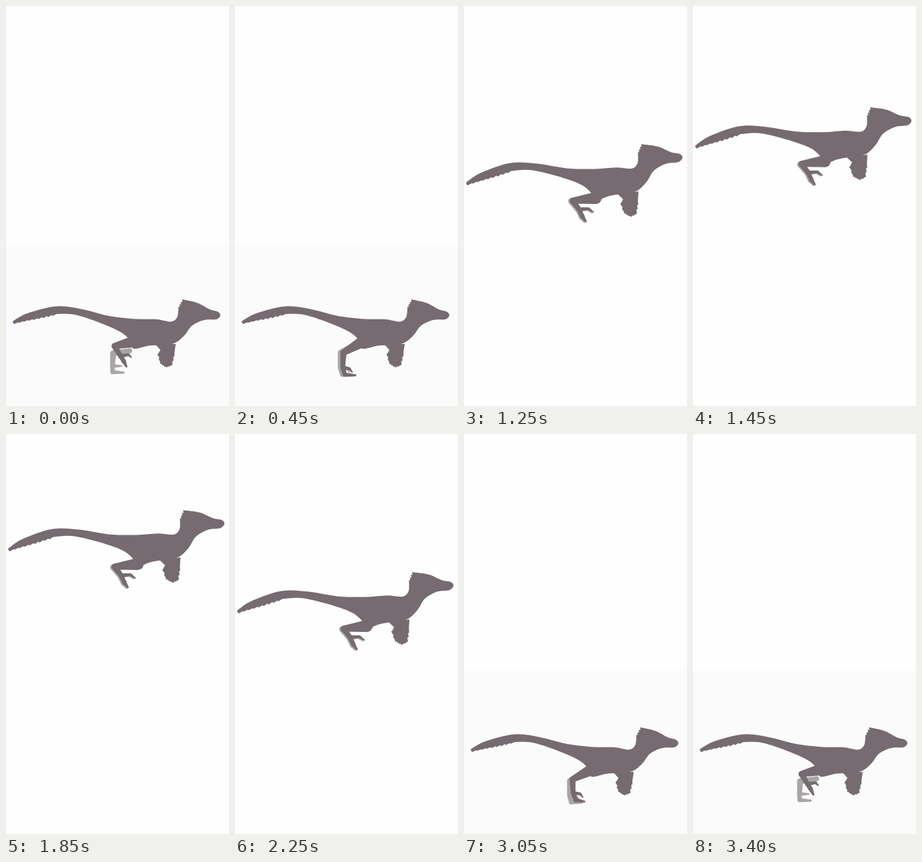
An HTML page that plays this animation: 335x600 px, repeating every 3500 ms.

```html
<!DOCTYPE html>
<html lang="en">
<head>
<meta charset="utf-8">
<title>Leaping raptor</title>
<style>
  html, body { margin: 0; width: 100%; height: 100%; overflow: hidden; background: #fefefe; }
  svg { display: block; width: 100%; height: 100%; }
  .near { fill: #766b70; }
  .far { fill: #a9a5a7; }
  .tint { fill: #fcfbfc; }
</style>
</head>
<body>
<svg viewBox="0 0 335 600">
  <defs><clipPath id="cut"><rect x="17" y="300" width="318" height="300"/></clipPath></defs>
  <g id="stage"></g>
</svg>
<script>
const LOOP = 3500, APEX = 1850;
const GROUND = 440, TOP = 115;

// "x,y x,y" -> [[x, y], ...]
const pts = s => s.split(' ').map(p => p.split(',').map(Number));
const mix = (a, b, k) => a.map((p, i) => p.map((v, c) => v + (b[i][c] - v) * k));
const shift = (a, dx, dy) => a.map(([x, y]) => [x + dx, y + dy]);

// Smooth curve through the points.
function smooth(p) {
  let d = `L${p[0]}`;
  for (let i = 0; i < p.length - 1; i++) {
    const a = p[i], b = p[i + 1], before = p[i - 1] || a, after = p[i + 2] || b;
    const c1 = a.map((v, c) => v + (b[c] - before[c]) / 6);
    const c2 = b.map((v, c) => v - (after[c] - a[c]) / 6);
    d += `C${c1} ${c2} ${b}`;
  }
  return d;
}

// Feathered edge: teeth on the outer side of a clockwise outline.
function fringe([ax, ay], [bx, by], n, depth) {
  const dx = bx - ax, dy = by - ay, len = Math.hypot(dx, dy);
  let d = '';
  for (let i = 0; i < n; i++) {
    const size = depth * (0.75 + 0.25 * Math.sin(i * 7)) / len;
    const tip = (i + 0.85) / n, base = (i + 1) / n;
    d += `L${ax + dx * tip + dy * size},${ay + dy * tip - dx * size}L${ax + dx * base},${ay + dy * base}`;
  }
  return d;
}

// Tapered, rounded chain of bones.
function limb(joints, radii) {
  return joints.map(([x, y], i) => {
    const dot = `<circle cx="${x}" cy="${y}" r="${radii[i]}"/>`;
    if (i === joints.length - 1) return dot;
    const [u, v] = joints[i + 1], len = Math.hypot(u - x, v - y) || 1;
    const nx = (y - v) / len, ny = (u - x) / len, r = radii[i], q = radii[i + 1];
    return dot + `<path d="M${x + nx * r},${y + ny * r}L${u + nx * q},${v + ny * q}
      ${u - nx * q},${v - ny * q} ${x - nx * r},${y - ny * r}Z"/>`;
  }).join('');
}

// Joints: hip, knee, ankle, foot, tip, raised toe, claw.
const leg = (j, cls, hip) => `<g class="${cls}">` +
  limb(j.slice(0, 5), [hip, 4.5, 3.5, 3.2, 1.4]) + limb([j[2], j[5], j[6]], [3, 2, 1]) + '</g>';

const back = pts('10,473 32,461 76,450.5 115,455 155,465 195,469.5 226,470 248,473.5 257,467 259,455');
const front = pts('267,440.5 288,445.5 306,455 318,458.5 322,464 316,470 298,471 280,479 269,493 258,503 ' +
  '246,507.5 215,509.5 192,514 186.5,502 172,489 138,474 103,463 76,462');
const wing = pts('255,507 253,520 248,539 240,541 232,535 229,521');

const torso = 'M' + smooth(back).slice(1) + fringe(back.at(-1), front[0], 4, 2.5) +
  smooth(front) + fringe(front.at(-1), [11, 476], 9, 2) + 'Z';
const arm = `M224,507L${wing[0]}` +
  wing.slice(1).map((p, i) => i ? fringe(wing[i], p, 2 + i % 2, 2) : `L${p}`).join('') + 'L232,516Z';
const body = `<g class="near"><path d="${torso}"/><path d="${arm}"/></g>`;

const run = pts('194,503 163,510 172,525 177,533 181,541 184,523 188,527');
const runFar = pts('186,517 161,521 160,540 160,549 177,550 168,540 174,540');
const plant = pts('194,502 163,520 162,542 165,553 181,554 172,544 176,549');
const plantFar = shift(plant, -4, 0);
const launch = pts('195,503 184,525 183,534 198,553 212,546 195,541 203,542');
const leap = pts('198,520 163,524 173,537 178,548 183,555 187,536 194,541');

const raptor = (near, far, torsoArt = body) => leg(far, 'far', 3.5) + torsoArt + leg(near, 'near', 9);
const panel = '<rect class="tint" y="355" width="335" height="245"/>';
const stride = k => panel + raptor(mix(run, plant, k), mix(runFar, plantFar, k));

const poses = [stride(0), stride(0.4), stride(0.8), stride(1), stride(1),
  '<rect class="tint" x="161" y="516" width="60" height="60" transform="rotate(35 191 546)"/>' +
    raptor(launch, shift(launch, -3, 1), `<g clip-path="url(#cut)">${body}</g>`),
  raptor(leap, shift(leap, -2, 1),
    `<g transform="translate(328 457) rotate(-5) scale(1.049) translate(-322 -462)">${body}</g>`)];

// The take-off plays forwards, then mirrored for the landing.
const ends = [100, 200, 450, 650, 850, 1050];
const lifts = [0, 0, 0, 0, 39, 105];

function flightHeight(t) {
  const k = t < APEX
    ? Math.min(6, Math.max(1, 5 - Math.floor((t - 1250) / 100)))
    : Math.round(1.2 * Math.floor((t - APEX) / 100));
  return TOP + 3 * k * (k + 1.2);
}

const stage = document.getElementById('stage');
stage.innerHTML = poses.map(art => `<g display="none">${art}</g>`).join('');

function draw(t) {
  const mirrored = t < APEX ? t : LOOP - 0.01 - t;
  const found = ends.findIndex(end => mirrored < end);
  const pose = found < 0 ? poses.length - 1 : found;
  const y = found < 0 ? flightHeight(t) : GROUND - lifts[found];
  [...stage.children].forEach((g, i) => g.setAttribute('display', i === pose ? 'inline' : 'none'));
  stage.setAttribute('transform', `translate(0 ${y - GROUND})`);
}

const start = performance.now();
function tick() {
  draw((performance.now() - start) % LOOP);
  requestAnimationFrame(tick);
}
tick();
</script>
</body>
</html>
```
